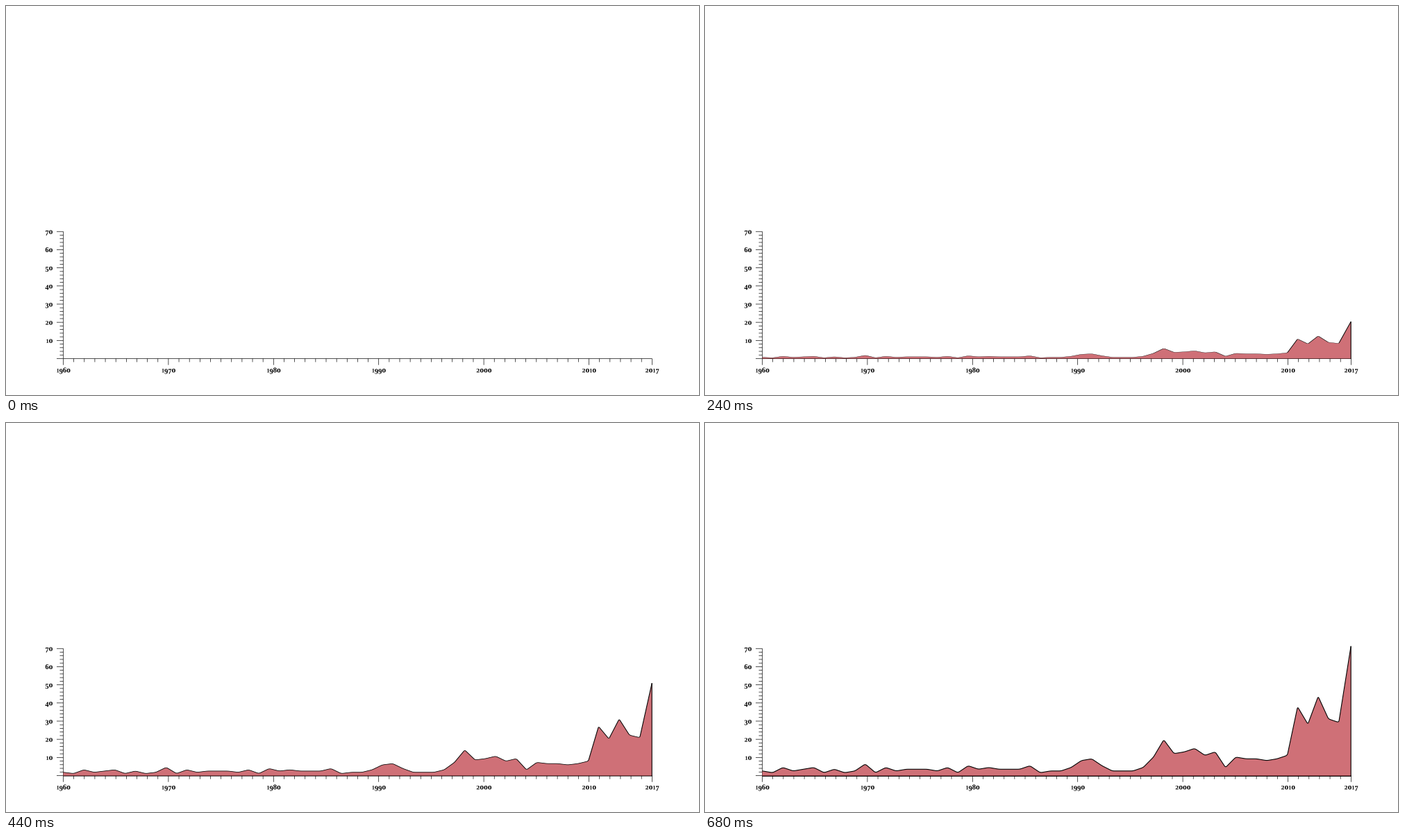
A matplotlib script for the animation above (1.2 s loop, 998 px wide and 561 px high).

```python
import numpy as np
import matplotlib.pyplot as plt
from matplotlib.animation import FuncAnimation
from matplotlib.patches import PathPatch, Polygon
from matplotlib.textpath import TextPath
from matplotlib.transforms import Affine2D

WIDTH, HEIGHT, DPI = 998, 561, 64
PT = 72 / DPI
FRAMES, INTERVAL, GROW_FRAMES = 30, 40, 17

LEFT, BASE = 82.5, 508.5          # chart origin in pixels
YEAR_STEP, TICK_STEP = 15.14, 5.236
DATA_STEP, UNIT, LAST_X = 14.825, 2.5, 930.2
SINK, STROKE = 0.8, 1.1           # area's bottom edge below the axis, outline width

VALUES = [3, 2, 5, 3, 4, 5, 2, 4, 2, 3, 7, 2, 5, 3, 4, 4, 4, 3, 5, 2,
          6, 4, 5, 4, 4, 4, 6, 2, 3, 3, 5, 9, 10, 6, 3, 3, 3, 5, 11, 21,
          13, 14, 16, 12, 14, 5, 11, 10, 10, 9, 10, 12, 40, 30, 46, 33, 31, 75]

fig = plt.figure(figsize=(WIDTH / DPI, HEIGHT / DPI), dpi=DPI, facecolor="white")
ax = fig.add_axes([0, 0, 1, 1])
ax.axis("off")


def old_style(digit):
    """Glyph, family, size and drop that give an old-style numeral."""
    if digit == "0":
        return "o", "Liberation Serif", 11.5, 0
    if digit == "1":
        return "1", "Liberation Serif", 8, 0
    if digit == "2":
        return "2", "DejaVu Serif", 7.2, 0
    return digit, "Liberation Serif", 10.5, 2 if digit in "34579" else 0


def label(text, x, y, align):
    """Draw a number with its baseline at y; align 0.5 centres, 1 sets it flush right."""
    glyphs = [old_style(d) for d in text]
    advances = [size * (0.5 if "Lib" in family else 0.696)
                for _, family, size, _ in glyphs]
    x -= align * sum(advances)
    for (char, family, size, drop), advance in zip(glyphs, advances):
        path = TextPath((0, 0), char, size=size,
                        prop={"family": family, "weight": "bold"})
        place = Affine2D().scale(1, -1).translate(x, y + drop)
        ax.add_patch(PathPatch(path.transformed(place), fc="black", lw=0, snap=False))
        x += advance


def draw_axes():
    # Snapping would move lines on pixel centres to the next pixel.
    style = dict(colors="black", lw=0.68 * PT, snap=False, zorder=1)
    right = LEFT + 56 * YEAR_STEP
    ax.vlines(LEFT, BASE - 35 * TICK_STEP, BASE, **style)
    ax.hlines(BASE, LEFT, right, **style)
    for i in range(57):
        x, major = LEFT + i * YEAR_STEP, i % 10 == 0 or i == 56
        ax.vlines(x, BASE, BASE + (9.2 if major else 5), **style)
        if major:
            label("2017" if i == 56 else str(1960 + i), x + 0.3, 528.4, 0.5)
    for i in range(36):
        y, major = BASE - i * TICK_STEP, i % 5 == 0
        ax.hlines(y, LEFT - (9.5 if major else 5), LEFT, **style)
        if major and i:
            label(str(2 * i), 67.4, y + 3.5, 1)


def rounded(points, radius=3):
    """Replace each inner corner with a short quadratic curve."""
    t = np.linspace(0, 1, 7)[:, None]
    parts = [points[:1]]
    for a, p, b in zip(points, points[1:], points[2:]):
        start = p + (a - p) * radius / np.hypot(*(a - p))
        end = p + (b - p) * radius / np.hypot(*(b - p))
        parts.append((1 - t) ** 2 * start + 2 * t * (1 - t) * p + t ** 2 * end)
    return np.vstack(parts + [points[-1:]])


def outline(points):
    """Polygon of a stroke along points, so that it can be squashed with the area."""
    tangent = np.gradient(points, axis=0)
    tangent /= np.hypot(*tangent.T)[:, None]
    offset = tangent[:, ::-1] * [-1, 1] * STROKE / 2
    return np.vstack([points + offset, (points - offset)[::-1]])


draw_axes()

xs = LEFT + DATA_STEP * np.arange(len(VALUES))
xs[-1] = LAST_X
curve = rounded(np.column_stack([xs, SINK - UNIT * np.array(VALUES)]))
corner, origin = np.array([LAST_X, SINK]), np.array([LEFT, SINK])

shapes = [np.vstack([curve, corner, origin]),
          outline(curve),
          outline(np.array([curve[-1], corner])),
          outline(np.array([corner + [STROKE / 2, 0], origin]))]
patches = [ax.add_patch(Polygon(shape, fc="black", lw=0, snap=False, zorder=3))
           for shape in shapes]
patches[0].set(facecolor="#c04049", alpha=0.75, zorder=2)

ax.set_xlim(0, WIDTH)
ax.set_ylim(HEIGHT, 0)


def update(frame):
    t = min(frame / GROW_FRAMES, 1)
    scale = t * t * (3 - 2 * t)
    for patch, shape in zip(patches, shapes):
        patch.set_xy(shape * [1, scale] + [0, BASE])
        patch.set_visible(frame > 0)
    return patches


animation = FuncAnimation(fig, update, frames=FRAMES, interval=INTERVAL,
                          repeat=True, repeat_delay=0)
plt.show()
```
